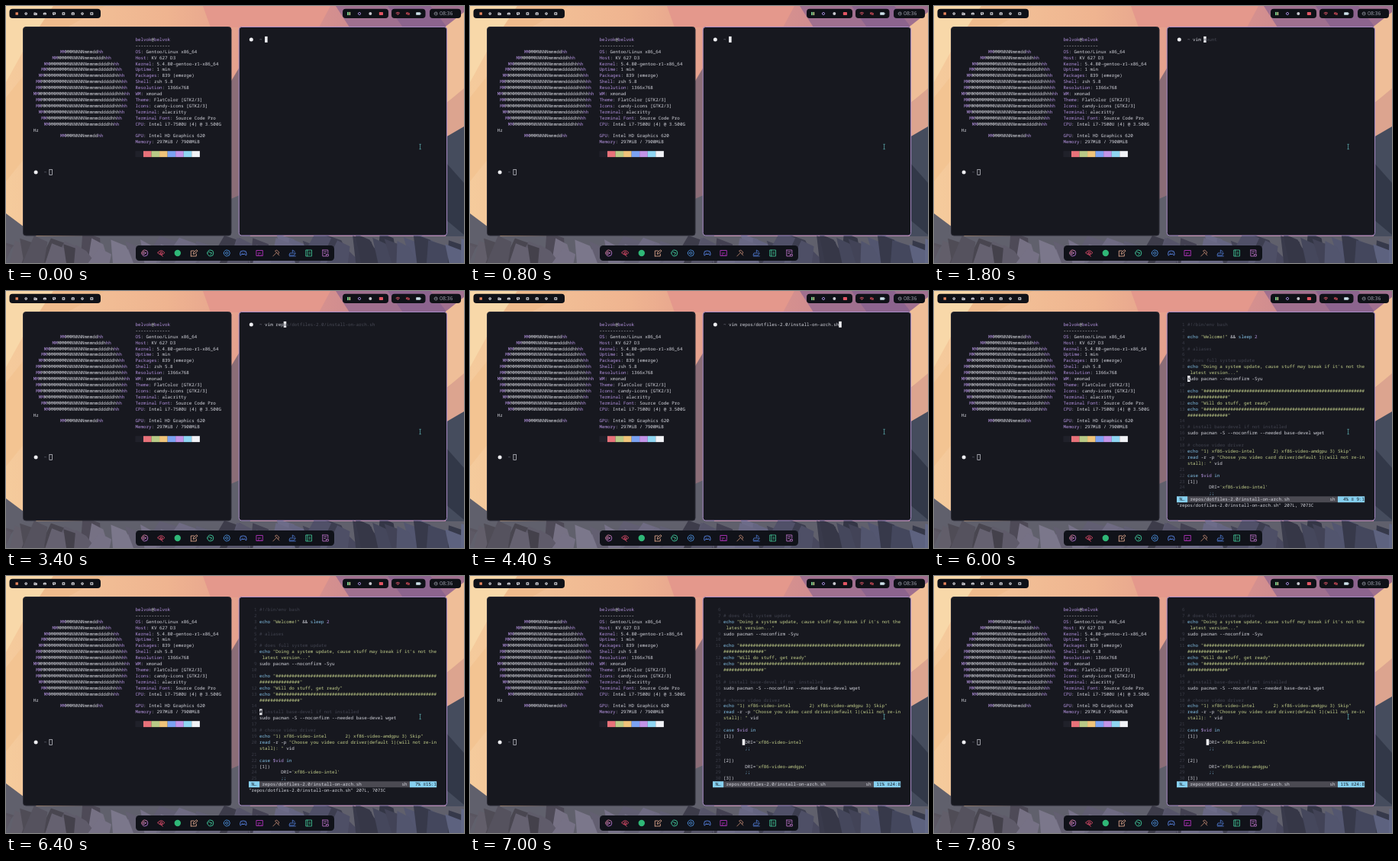
These frames come from a looping animation (600x337 px, 8000 ms). An HTML page:

```html
<!DOCTYPE html>
<html lang="en">
<head>
<meta charset="utf-8">
<title>Desktop</title>
<style>
html, body { margin: 0; width: 100%; height: 100%; overflow: hidden; background: #17181f; }
svg { display: block; width: 100vw; height: 100vh; }
text { white-space: pre; text-rendering: geometricPrecision; }
.mono { font: 5.86px "Noto Sans Mono", "DejaVu Sans Mono", monospace; }
.clock { font: 6.8px "Open Sans", "Noto Sans", sans-serif; }
</style>
</head>
<body>
<svg id="stage" viewBox="0 0 600 337">
  <defs>
    <linearGradient id="sky">
      <stop offset="0" stop-color="#f5cb9c"/>
      <stop offset=".35" stop-color="#efb490"/>
      <stop offset=".6" stop-color="#df968d"/>
      <stop offset="1" stop-color="#b67d93"/>
    </linearGradient>
    <linearGradient id="candy" x1="0" y1="0" x2="1" y2="1">
      <stop offset="0" stop-color="#f08a9a"/>
      <stop offset="1" stop-color="#a36fe0"/>
    </linearGradient>
  </defs>
  <g id="wall"></g>
  <g id="bars"></g>
  <g id="left" class="mono"></g>
  <g id="right" class="mono"></g>
  <path d="M541.4 181.3h2.4M542.6 181.3v6.4M541.4 187.7h2.4" stroke="#58a3a6" stroke-width=".8" fill="none"/>
</svg>
<script>
const LOOP = 8000, STEP = 200;
const CW = 3.516, RH = 7.91, TOP = 39.9, LX = 35.8, RX = 318;
const INK = {
  w: '#d5d6de', p: '#b594e0', b: '#86c5ea', y: '#c3cf8b',
  d: '#41434f', g: '#484a55', k: '#15161d', n: '#3a3c47', m: '#8b8d99'
};
const $ = id => document.getElementById(id);
const esc = s => s.replace(/&/g, '&amp;').replace(/</g, '&lt;');
const rect = (x, y, w, h, fill, more = '') =>
  `<rect x="${x}" y="${y}" width="${w}" height="${h}" fill="${fill}" ${more}/>`;
const dot = (x, y, r, fill) => `<circle cx="${x}" cy="${y}" r="${r}" fill="${fill}"/>`;
const poly = (fill, pts) => `<polygon points="${pts}" fill="${fill}"/>`;
const rowY = r => TOP + r * RH;
const plain = s => s.replace(/\{\w\}/g, '');

// {x} inside a string switches the ink
function put(x, col, row, s) {
  const bits = s.split(/\{(\w)\}/);
  let out = '';
  for (let i = 0; i < bits.length; i += 2) {
    if (bits[i]) out += `<tspan fill="${INK[i ? bits[i - 1] : 'w']}">${esc(bits[i])}</tspan>`;
  }
  return `<text x="${x + col * CW}" y="${rowY(row) + 6}">${out}</text>`;
}

const cell = (x, col, row, fill, n = 1) =>
  rect(x + col * CW, rowY(row), n * CW, RH, fill);

const prompt = (x, row) =>
  dot(x + 3.3, rowY(row) + 4.2, 2.5, '#eeeef2') + put(x, 4, row, '{m}~');

// Faceted rocks along the lower edge, warm grey on the left to navy on the right
function rocks() {
  let seed = 11, s = '';
  const rnd = () => (seed = seed * 16807 % 2147483647) / 2147483647;
  for (let i = 0; i < 60; i++) {
    const x = i % 30 * 21 + rnd() * 12 - 14, k = Math.max(0, Math.min(1, x / 600));
    const y = 296 + rnd() * 22, light = 28 + 24 * rnd() - 6 * k;
    const hue = 260 - 30 * k, lean = rnd() * 34 - 17;
    s += poly(`hsl(${hue} ${6 + 10 * k}% ${light}%)`,
      `${x},${y} ${x + 14 + rnd() * 12},${y + 8} ${x + 22 + lean},337 ${x - 6 + lean},337`);
  }
  return s;
}

function drawWall() {
  $('wall').innerHTML = rect(0, 0, 600, 337, 'url(#sky)') + [
    ['#f8d8a9', '0,0 62,0 22,60 0,100'],
    ['#efbb8d', '62,0 130,0 80,28 22,60'],
    ['#f3c492', '0,120 24,90 24,200 0,230'],
    ['#e4988c', '258,0 425,0 410,28 268,28'],
    ['#a0708f', '432,0 600,0 600,40 450,28'],
    ['#8c648e', '500,0 556,0 578,28 520,28'],
    ['#efbe98', '572,30 600,8 600,110 576,128'],
    ['#dca48f', '576,128 600,108 600,160 576,172'],
    ['#8b6d77', '294,100 306,80 306,260 294,260'],
    ['#454c5d', '576,172 600,158 600,337 576,337'],
    ['#323848', '576,205 600,232 600,300 576,280'],
    ['#60606c', '0,272 24,290 40,302 180,300 290,255 306,248 320,302 600,302 600,337 0,337']
  ].map(a => poly(...a)).join('') + rocks();
}

const line = (x, y, d, color, w = 1) =>
  `<path transform="translate(${x} ${y})" d="${d}" fill="none" stroke="${color}" stroke-width="${w}" stroke-linecap="round" stroke-linejoin="round"/>`;
const ring = r => `M${-r} 0a${r} ${r} 0 1 0 ${2 * r} 0a${r} ${r} 0 1 0 ${-2 * r} 0`;

function drawBars() {
  const pill = (x, w) => rect(x, 3.8, w, 12.2, '#0f1117', 'rx="4"');
  let s = pill(4.5, 119.5) + pill(441, 60) + pill(505, 44.5) + pill(555, 41);
  s += rect(12.5, 8.3, 3.4, 3.4, '#e9875f');
  const marks = [
    ring(1.2), 'M-1.5-1h1l.6.6h1.6v1.8h-3.2z', 'M-1.5 1v-1.5h3v1.5zM-.7-1h.1M.8-1h.1',
    'M-1.5-1.3h3v2h-1.6l-.8.8v-.8h-.6z', 'M-1.3-1.3h2.6v2.6h-2.6z',
    'M-1.5-.9h3v2.1h-3zM-.5-1.3h1', ring(1.2), 'M-1.4-1.2h2.8v2.4h-2.8z'
  ];
  marks.forEach((d, i) => s += line(26.2 + i * 12.3, 10, d, '#d9d9df', 1.1));
  s += rect(447, 7.9, 1.8, 4.2, '#75cd8a') + rect(449.5, 7.9, 1.7, 4.2, '#b9c885');
  s += line(463, 10, ring(1.6), '#a48bd9', .9) + dot(477.3, 10, 2, '#c9c9d0');
  s += rect(488.8, 8, 5.2, 4, '#e25563', 'rx=".7"');
  s += line(513.3, 10.3, 'M-2.3-1.2q2.3-1.8 4.6 0M-1.3 0q1.3-1 2.6 0M0 1.1v.1', '#e2586a', .9);
  s += line(526.5, 10, 'M-2.3 0q2.3-2.8 4.6 0q-2.3 2.8-4.6 0M-1.8-1.8l3.6 3.6', '#d94f5c', .9);
  s += rect(537.2, 8.2, 5.6, 3.6, '#cfe3ec', 'rx=".6"') + rect(543, 9.3, .7, 1.4, '#cfe3ec');
  s += line(563.2, 10, ring(2.1) + 'M0-1v1.1h.9', '#9a9ca9', .7);
  s += '<text class="clock" x="568" y="12.4" fill="#a4a6b3">08:36</text>';

  s += rect(170, 314, 260, 20, '#101219', 'rx="4.5"');
  const dock = [
    ['url(#candy)', ring(4) + 'M-1.5-1.8l3.4 1.6l-3.4 2z'],
    ['#e8506f', 'M-4.5-.5q4.5-5.6 9 0q-4.5 5.6-9 0M-1.3 0a1.4 1.4 0 1 0 2.8 0a1.4 1.4 0 1 0-2.8 0M0 2.4l2 2'],
    null,
    ['#dda58c', 'M-4 4v-7h4M-4 4h7v-3M-1 1l.4-2l4-3.2l1.3 1.4l-3.8 3.5z'],
    ['#42cda0', ring(4) + 'M-2-1.5l4 1.5l-2 2'],
    ['#4b8fdc', ring(4) + ring(1.6)],
    ['#5a86e8', 'M-3.8 3q-1.2-1 .4-5.2q3.4-1.6 6.8 0q1.6 4.2.4 5.2l-2-1.5h-3.6zM-1.3 0h.1M1.3 0h.1'],
    ['#b033bb', 'M-4-3.5h8v7h-8zM-2 0h3M-2 2h1M2 2h.1'],
    ['#b5826c', 'M-4 4l5-5M-1-3l2-1l3 3l-1 2zM2 1l2 2'],
    ['#4a73c6', 'M-4 3h6l2-3h-7zM0-1v-3l3 2M-4 4h8'],
    ['#3fb78e', 'M-3.7-4h7.4v8h-7.4zM-2 4v-8M0-1h2M0 1h2'],
    ['#b56fc1', 'M-3.5-4h7v4M-3.5-4v8h4M-1.5-1.7h3M-1.5.5h1.5M1.5 1.5h2.5v2.5h-2.5z']
  ];
  dock.forEach((a, i) => {
    const x = 181.8 + i * 21.5;
    s += a ? line(x, 324, a[1], a[0], .9) : dot(x, 324, 4.2, '#2fb777');
  });
  $('bars').innerHTML = s;
}

function drawLeft() {
  let s = rect(22.5, 27.5, 272.5, 273.5, '#17181f', 'rx="3.5" stroke="#2a2a34" stroke-width="1"');
  for (let r = 2; r < 17; r++) {
    if (r === 15) continue;
    const half = Math.round(Math.sqrt(62 ** 2 - ((r - 9) * RH) ** 2) / CW);
    const n = half * 2;
    const str = Array.from({ length: n }, (_, i) => 'MMMMNNNmmddhh'[Math.floor(i / n * 13)]).join('');
    s += put(LX, 18 - half, r, `{p}${str.slice(0, 2)}{w}${str.slice(2, -2)}{p}${str.slice(-2)}`);
  }
  const info = [
    '{p}belvok{w}@{p}belvok', '-------------', 'OS: Gentoo/Linux x86_64', 'Host: KV 627 D3',
    'Kernel: 5.4.80-gentoo-r1-x86_64', 'Uptime: 1 min', 'Packages: 839 (emerge)',
    'Shell: zsh 5.8', 'Resolution: 1366x768', 'WM: xmonad', 'Theme: FlatColor [GTK2/3]',
    'Icons: candy-icons [GTK2/3]', 'Terminal: alacritty', 'Terminal Font: Source Code Pro',
    'CPU: Intel i7-7500U (4) @ 3.500G', '', 'GPU: Intel HD Graphics 620', 'Memory: 297MiB / 7900MiB'
  ];
  info.forEach((t, r) => s += put(LX, 38, r, t.replace(/^([\w ]+):/, '{p}$1{w}:')));
  s += put(LX, 0, 15, 'Hz');
  ['#20212a', '#e8727a', '#b9ca86', '#f0c47a', '#7ba2f2', '#c394e8', '#8fd6f2', '#f2f3f7']
    .forEach((c, i) => s += cell(LX, 38 + i * 3, 19, c, 3.03));
  s += prompt(LX, 22) +
    rect(LX + 6 * CW, rowY(22) + .4, CW, RH - .8, 'none', 'stroke="#d5d6de" stroke-width=".7"');
  $('left').innerHTML = s;
}

const FILE = 'repos/dotfiles-2.0/install-on-arch.sh';
const RULE = `{b}echo {y}"${'#'.repeat(60)}\n{y}${'#'.repeat(15)}"`;
const TAB = ' '.repeat(8);
const CODE = [
  '{d}#!/bin/env bash', '', '{b}echo {y}"Welcome!"{w} && {b}sleep {p}2', '', '{d}# aliases', '',
  '{d}# does full system update',
  '{b}echo {y}"Doing a system update, cause stuff may break if it\'s not the\n{y} latest version..."',
  'sudo pacman --noconfirm -Syu', '',
  RULE, '{b}echo {y}"Will do stuff, get ready"', RULE, '',
  '{d}# install base-devel if not installed',
  'sudo pacman -S --noconfirm --needed base-devel wget', '',
  '{d}# choose video driver',
  '{b}echo {y}"1) xf86-video-intel       2) xf86-video-amdgpu 3) Skip"',
  '{b}read {w}-r -p {y}"Choose you video card driver(default 1)(will not re-in\n{y}stall): "{w} vid',
  '', '{b}case {p}$vid {b}in',
  '[1])', TAB + "DRI={y}'xf86-video-intel'", TAB + '{b};;', '',
  '[2])', TAB + "DRI={y}'xf86-video-amdgpu'", TAB + '{b};;',
  '[3])'
];

const KEYS = [[1200, 'v'], [1400, 'vi'], [1600, 'vim'], [1800, 'vim '], [2600, 'vim r'],
  [3000, 'vim re'], [3200, 'vim rep'], [3600, 'vim ' + FILE]];

function shell(t) {
  const typed = KEYS.reduce((s, [at, text]) => t >= at ? text : s, '');
  const full = typed.length > 4 ? 'vim ' + FILE : typed ? 'vim mount' : '';
  const ghost = full.slice(typed.length), col = 6 + typed.length;
  return prompt(RX, 0) + put(RX, 6, 0, typed) + cell(RX, col, 0, '#f0f0f4') +
    put(RX, col, 0, `{d}${ghost.slice(0, 1)}{g}${ghost.slice(1)}`);
}

const message = () => put(RX, 0, 30, `"${FILE}" 207L, 7073C`);

function editor(t) {
  const cur = Math.max(1, Math.min(24, 9 + (t - 6000) / STEP * 3));
  const first = Math.max(1, cur - 18);
  const at = CODE[cur - 1].startsWith(TAB) ? 7 : 0;
  let s = '', row = 0;
  for (let n = first; n <= CODE.length && row < 29; n++) {
    const here = n === cur;
    s += put(RX, 0, row, '{n}' + String(n).padStart(3));
    if (here) s += cell(RX, 4 + at, row, '#f0f0f4');
    CODE[n - 1].split('\n').forEach((part, i) => {
      s += put(RX, 4, row, part);
      if (here && !i) s += put(RX, 4 + at, row, '{k}' + plain(part).charAt(at));
      row++;
    });
  }
  const pct = Math.floor(cur / 207 * 100) + '%';
  const pos = `${cur}:${at + 1}`;
  s += cell(RX, 0, 29, '#4b4a52', 70) + cell(RX, 0, 29, '#86d0f0', 4) + cell(RX, 60, 29, '#86d0f0', 10);
  s += put(RX, 1, 29, '{k}N…') + put(RX, 5, 29, FILE) + put(RX, 57, 29, 'sh');
  s += put(RX, 61, 29, `{k}${pct.padStart(3)} ≡${pos.padStart(4)}`);
  return s + (first === 1 ? message() : '');
}

const FRAME = rect(305.2, 27.5, 272.4, 273.5, '#17181f', 'rx="3.5" stroke="#a98cc6" stroke-width="1"');
let shown = -1;

function draw(ms) {
  const t = Math.floor(ms % LOOP / STEP) * STEP;
  if (t === shown) return;
  shown = t;
  $('right').innerHTML = FRAME + (t < 5000 ? shell(t) : t < 5400 ? message() : editor(t));
}

drawWall();
drawBars();
drawLeft();
draw(0);
const start = performance.now();
(function tick() {
  draw(performance.now() - start);
  requestAnimationFrame(tick);
})();
</script>
</body>
</html>
```
